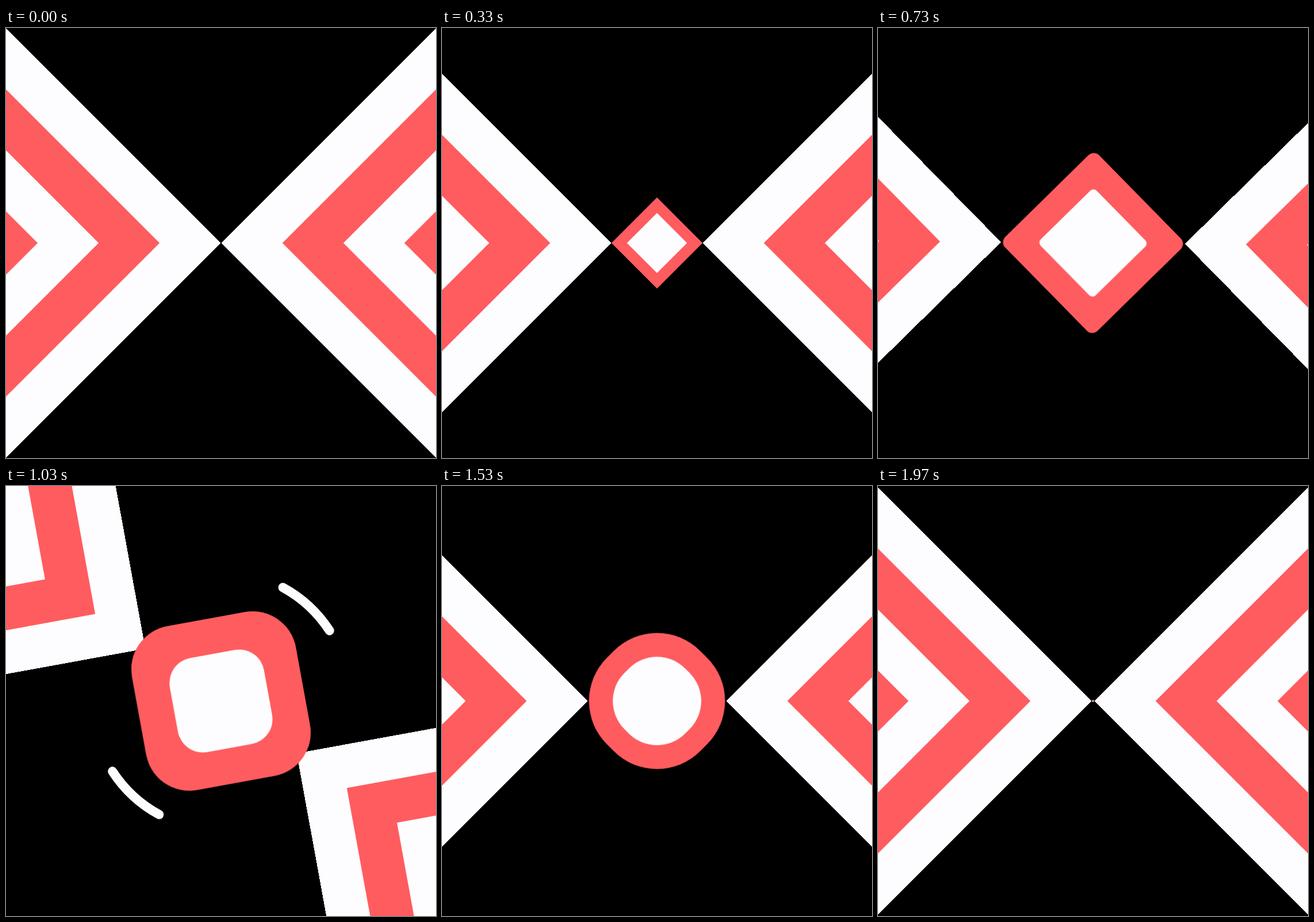
Recreate the animation shown at these times as an HTML page without scripts. Size 748 px wide and 748 px high, loop 2000 ms.

```html
<!DOCTYPE html>
<html lang="en">
<head>
<meta charset="utf-8">
<title>Spinning diamonds</title>
<style>
  @property --head { syntax: "<number>"; inherits: true; initial-value: 0; }
  @property --tail { syntax: "<number>"; inherits: true; initial-value: 0; }

  :root {
    --white: #fdfdff;
    --red: #ff5c5f;
    --swing: cubic-bezier(.33, 0, .67, 1);
    --whip: cubic-bezier(.91, 0, .09, 1);
    --sine: cubic-bezier(.37, 0, .63, 1);
  }
  html, body {
    margin: 0;
    width: 100%;
    height: 100%;
    overflow: hidden;
    background: #000;
  }
  svg { display: block; width: 100vw; height: 100vh; }

  .white { fill: var(--white); }
  .red { fill: var(--red); }

  .spin { animation: spin 2s var(--whip) infinite; }
  .slide { animation: slide 2s var(--swing) infinite; }
  .grow { animation: grow 2s var(--swing) infinite; }
  .hole { animation: hole 2s linear infinite; }
  .soft { animation: soften 2s linear infinite; }
  .trails {
    fill: none;
    stroke: var(--white);
    stroke-width: 16px;
    stroke-linecap: round;
    stroke-dasharray: calc((var(--head) - var(--tail)) * 1px) 400px;
    stroke-dashoffset: calc(var(--tail) * -1px);
    animation:
      head 2s var(--sine) infinite,
      tail 2s var(--sine) infinite,
      show 2s step-end infinite;
  }

  @keyframes spin {
    0%, 33.1% { transform: rotate(0deg); }
    75.6%, 100% { transform: rotate(180deg); }
  }
  /* distance of the large corners from the centre */
  @keyframes slide {
    0% { transform: translateX(.7px); }
    33.3%, 66% { transform: translateX(160px); }
    98.35% { transform: translateX(3px); animation-timing-function: linear; }
    100% { transform: translateX(.7px); }
  }
  @keyframes grow {
    0% { transform: scale(0); }
    33.3% { transform: scale(1.13); animation-timing-function: cubic-bezier(.4, 0, .8, .8); }
    51.6% { transform: scale(1.45); animation-timing-function: ease-out; }
    66% { transform: scale(1.525); }
    98.35% { transform: scale(.02); animation-timing-function: linear; }
    100% { transform: scale(0); }
  }
  @keyframes hole {
    0% { transform: scale(.72); }
    33.3% { transform: scale(.6); }
    51.6% { transform: scale(.574); }
    60% { transform: scale(.577); }
    66% { transform: scale(.59); }
    76.6% { transform: scale(.65); }
    100% { transform: scale(.72); }
  }
  /* square corners turn into a circle */
  @keyframes soften {
    0%, 32.8% { rx: 0px; ry: 0px; }
    36.6% { rx: 11.8px; ry: 11.8px; }
    51.6% { rx: 53px; ry: 53px; }
    60% { rx: 68px; ry: 68px; }
    76.6% { rx: 92.6px; ry: 92.6px; }
    86%, 100% { rx: 100px; ry: 100px; }
  }
  @keyframes head {
    0%, 40% { --head: 0; }
    70.25%, 100% { --head: 180; }
  }
  @keyframes tail {
    0%, 42.9% { --tail: 0; }
    75.85%, 100% { --tail: 180; }
  }
  @keyframes show {
    0% { opacity: 0; }
    41% { opacity: 1; }
    75%, 100% { opacity: 0; }
  }
</style>
</head>
<body>
<svg viewBox="-374 -374 748 748">
  <defs>
    <g id="corner" transform="rotate(-45)">
      <rect class="white" width="1000" height="1000"/>
      <rect class="red" x="75" y="75" width="1000" height="1000"/>
      <rect class="white" x="150" y="150" width="1000" height="1000"/>
      <rect class="red" x="225" y="225" width="1000" height="1000"/>
    </g>
    <path id="trail" d="M0-225A225 225 0 0 1 0 225" pathLength="180"/>
  </defs>

  <g class="spin">
    <g class="slide"><use href="#corner"/></g>
    <g transform="scale(-1)">
      <g class="slide"><use href="#corner"/></g>
    </g>
    <g transform="rotate(45)">
      <g class="grow">
        <rect class="red soft" x="-100" y="-100" width="200" height="200"/>
        <g class="hole">
          <rect class="white soft" x="-100" y="-100" width="200" height="200"/>
        </g>
      </g>
    </g>
  </g>

  <g class="trails">
    <use href="#trail"/>
    <use href="#trail" transform="rotate(180)"/>
  </g>
</svg>
</body>
</html>
```
